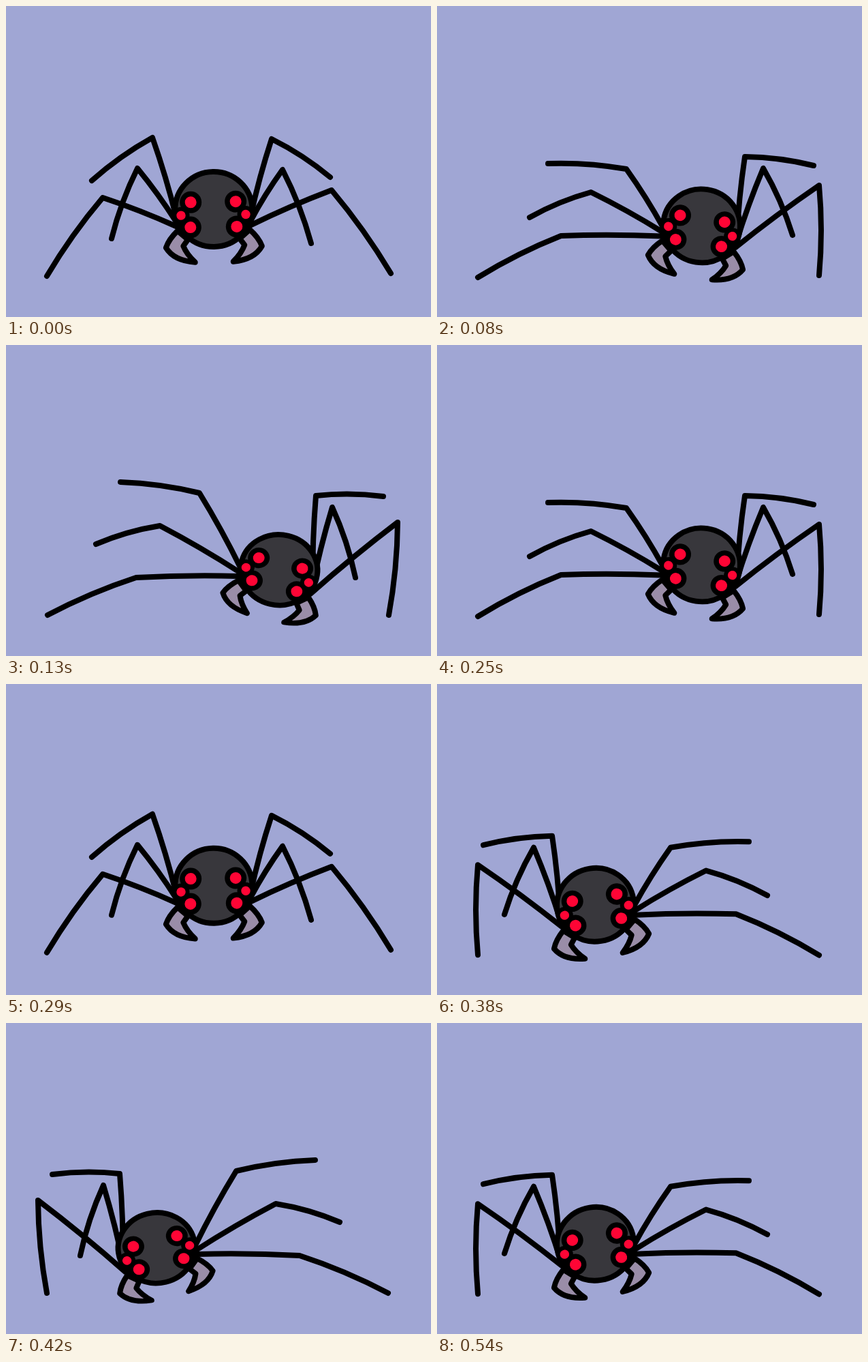
Animation, 624 px wide and 456 px high, one loop 0.58 s. Source, as an HTML page with a canvas:

```html
<!DOCTYPE html>
<html lang="en">
<head>
<meta charset="utf-8">
<title>Swaying spider</title>
<style>
html, body { margin: 0; width: 100%; height: 100%; overflow: hidden; background: #a0a6d4; }
canvas { display: block; }
</style>
</head>
<body>
<canvas id="stage" width="624" height="456"></canvas>
<script>
const ctx = document.getElementById('stage').getContext('2d');
const INK = '#000', SKY = '#a0a6d4', SKIN = '#38373c', FANG = '#9a8da8', RED = '#ff0535';
const SHIN_BOW = 3, THIGH_BOW = 1.5;

// The head is rigid: each pose only moves, tilts and squashes it.
// Legs run top to bottom, each as tip x, y and knee x, y.
const upright = {
  head: { x: 304.5, y: 305.7, tilt: -1, squash: 1 },
  left: [[126, 256, 215, 193], [155, 341, 193, 238], [60, 396, 142, 281]],
  right: [[476, 251, 390, 195], [448, 348, 406, 240], [565, 392, 478, 270]]
};
const leaning = {
  head: { x: 386.8, y: 329.8, tilt: 8.9, squash: 0.98 },
  left: [[163, 231, 278, 239], [136, 310, 226, 273], [60, 398, 182, 337]],
  right: [[553, 234, 452, 221], [522, 336, 479, 238], [561, 395, 561, 263]]
};
const stretched = {
  head: { x: 398.5, y: 336.7, tilt: 14.5, squash: 0.94 },
  left: [[168, 201, 284, 217], [132, 292, 226, 265], [61, 396, 191, 341]],
  right: [[554, 222, 455, 221], [513, 341, 479, 238], [562, 396, 575, 260]]
};

// Right half of the face; the left half is its mirror image
const eyes = [
  { x: 33, y: -18.5, ring: 16, pupil: 8.5 },
  { x: 47.5, y: 0.6, ring: 12.5, pupil: 6.7 },
  { x: 34, y: 18.3, ring: 16, pupil: 8.5 }
];
const fang = new Path2D('M53 23Q66 35 70.5 47.5Q59 67 28 69.5Q40 58 45 45.5L38 36Z');

const still = [1, 0, 0, 1, 0, 0];
const raised = [1, 0, 0, 1, 0, -2.2];
const mirrored = [-1, 0, 0, 1, 622, 0];
const mirroredTilt = [-1, 0.005, 0, 1, 621, -0.6];

const steps = [
  { until: 80, pose: upright, place: still },
  { until: 130, pose: leaning, place: still },
  { until: 250, pose: stretched, place: still },
  { until: 290, pose: leaning, place: still },
  { until: 380, pose: upright, place: raised },
  { until: 420, pose: leaning, place: mirroredTilt },
  { until: 540, pose: stretched, place: mirrored },
  { until: 580, pose: leaning, place: mirroredTilt }
];
const LOOP = 580;

function headMatrix({ x, y, tilt, squash }) {
  return new DOMMatrix().translate(x, y).scale(1, squash).rotate(tilt);
}

// Curve from a to b whose middle is pushed sideways by bow
function bendTo(a, b, bow) {
  const dx = b.x - a.x, dy = b.y - a.y;
  const push = 2 * bow / Math.hypot(dx, dy);
  ctx.quadraticCurveTo((a.x + b.x) / 2 + dy * push, (a.y + b.y) / 2 - dx * push, b.x, b.y);
}

function drawLegs(legs, side, matrix) {
  legs.forEach(([tipX, tipY, kneeX, kneeY], i) => {
    const tip = { x: tipX, y: tipY }, knee = { x: kneeX, y: kneeY };
    const hip = matrix.transformPoint({ x: side * 54.5, y: 4 + 6.3 * i });
    ctx.beginPath();
    ctx.moveTo(tip.x, tip.y);
    bendTo(tip, knee, -side * SHIN_BOW);
    bendTo(knee, hip, -side * THIGH_BOW);
    ctx.stroke();
  });
}

function dot(x, y, r, color) {
  ctx.fillStyle = color;
  ctx.beginPath();
  ctx.arc(x, y, r, 0, Math.PI * 2);
  ctx.fill();
}

function bothSides(draw) {
  for (const side of [-1, 1]) {
    ctx.save();
    ctx.scale(side, 1);
    draw();
    ctx.restore();
  }
}

function drawHead() {
  bothSides(() => {
    ctx.fillStyle = FANG;
    ctx.fill(fang);
    ctx.stroke(fang);
  });

  ctx.fillStyle = SKIN;
  ctx.beginPath();
  ctx.ellipse(0.5, -7.7, 56.5, 55, 0, 0, Math.PI * 2);
  ctx.fill();
  ctx.stroke();

  bothSides(() => {
    for (const e of eyes) dot(e.x, e.y, e.ring, INK);
    for (const e of eyes) dot(e.x, e.y, e.pupil, RED);
  });
}

function drawSpider({ head, left, right }) {
  const matrix = headMatrix(head);
  ctx.strokeStyle = INK;
  ctx.lineCap = ctx.lineJoin = 'round';
  ctx.lineWidth = 8;
  drawLegs(left, -1, matrix);
  drawLegs(right, 1, matrix);
  ctx.transform(matrix.a, matrix.b, matrix.c, matrix.d, matrix.e, matrix.f);
  drawHead();
}

function render(ms) {
  const t = ms % LOOP;
  const { pose, place } = steps.find(s => t < s.until);
  ctx.setTransform(1, 0, 0, 1, 0, 0);
  ctx.fillStyle = SKY;
  ctx.fillRect(0, 0, 624, 456);
  ctx.setTransform(...place);
  drawSpider(pose);
}

let start;
function tick(now) {
  start ??= now;
  render(Math.max(0, now - start));
  requestAnimationFrame(tick);
}
render(0);
requestAnimationFrame(tick);
</script>
</body>
</html>
```
